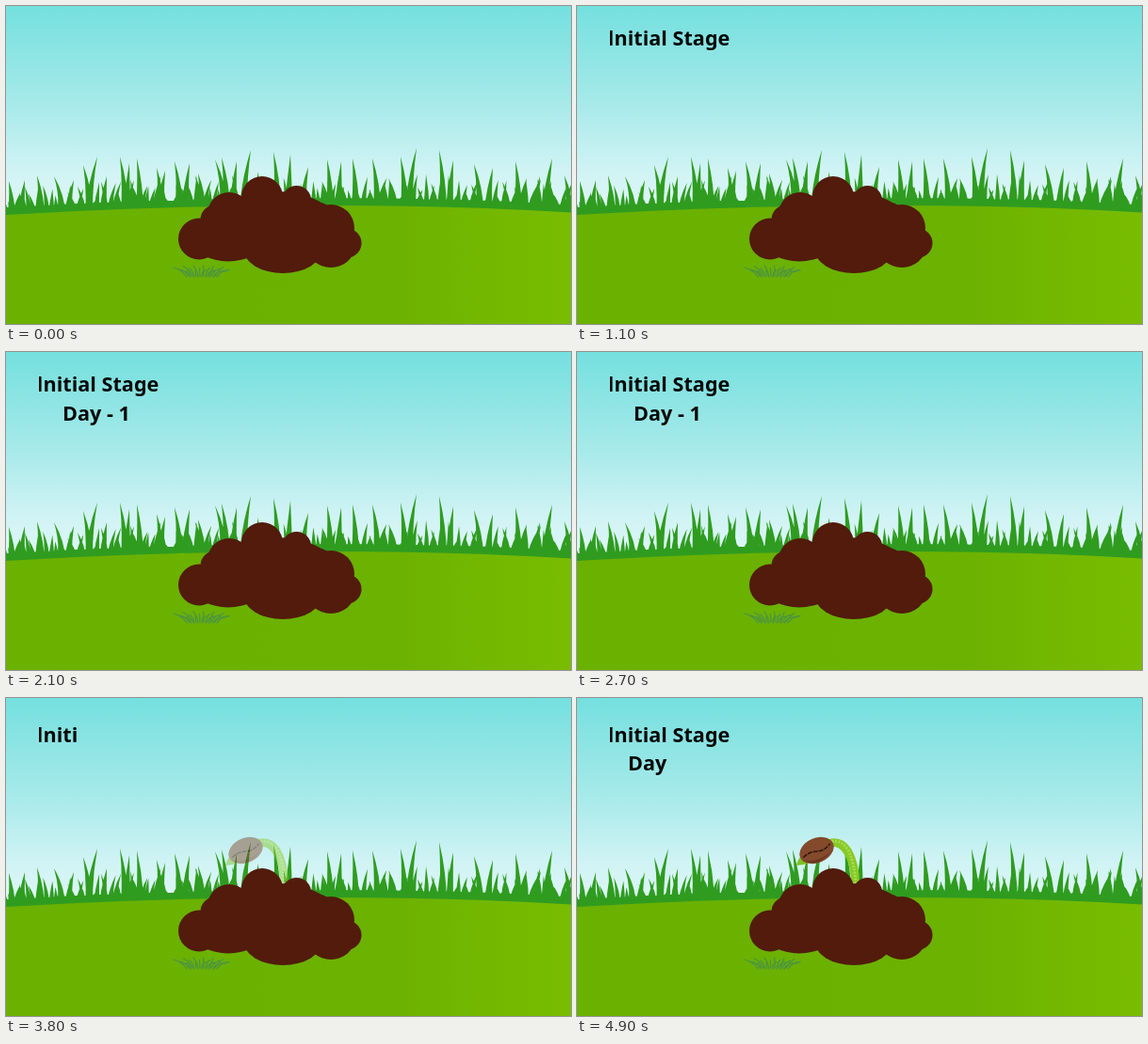
Write an HTML page that moves like this. It is 600x338 px and loops after 5000 ms.

```html
<!DOCTYPE html>
<html lang="en">
<head>
<meta charset="utf-8">
<title>Sprouting seed</title>
<style>
  html, body { margin: 0; width: 100%; height: 100%; overflow: hidden; }
  svg { display: block; width: 100vw; height: 100vh; }
  text { font: 600 21.6px "Noto Sans", "Open Sans", sans-serif; fill: #050807; }
  #cap { font-family: "Open Sans", sans-serif; }
</style>
</head>
<body>
<svg viewBox="0 0 600 338" preserveAspectRatio="none">
  <defs>
    <linearGradient id="sky" x1="0" y1="0" x2="0" y2="1">
      <stop offset="0" stop-color="#74e0de"/>
      <stop offset=".5" stop-color="#a9eaea"/>
      <stop offset=".8" stop-color="#cff3f4"/>
      <stop offset="1" stop-color="#def6f7"/>
    </linearGradient>
    <linearGradient id="lawn">
      <stop offset="0" stop-color="#6bb100"/>
      <stop offset=".7" stop-color="#6cb200"/>
      <stop offset=".82" stop-color="#72b700"/>
      <stop offset="1" stop-color="#79bc00"/>
    </linearGradient>
  </defs>

  <rect width="600" height="215" fill="url(#sky)"/>
  <path id="grass" fill="#2f9c20"/>
  <path d="M0 222Q170 212 340 212Q480 212 600 219.5V338H0Z" fill="url(#lawn)"/>

  <g id="sprout" opacity="0">
    <path d="M264 151Q281 145 291 160Q300 175 300 198L291 199Q291 176 283 165Q276 155 266 159Z" fill="#87c927"/>
    <path d="M267 153Q282 149 289 164Q295 177 296 198" fill="none" stroke="#a9dc4d" stroke-width="3" stroke-dasharray="2 1.5"/>
    <path d="M233 178Q235 170 239 167L247 175Q240 178 233 178Z" fill="#7fc022"/>
    <g transform="translate(254.500 162) rotate(-24)">
      <ellipse rx="19" ry="13" fill="#834a2c"/>
      <path d="M-17 4Q-4 13 14 7Q5 12 -4 12Q-13 10 -17 4Z" fill="#6b361f"/>
      <path d="M-16 1Q-8 -2 0 1T16 -1" fill="none" stroke="#351509" stroke-width="1.500" stroke-dasharray="5 1"/>
    </g>
  </g>

  <g fill="#521b0b">
    <circle cx="205" cy="247.500" r="22"/>
    <circle cx="222" cy="227" r="15.500"/>
    <circle cx="237" cy="221" r="23"/>
    <circle cx="272" cy="203" r="22"/>
    <circle cx="308.500" cy="206.500" r="15.500"/>
    <circle cx="329" cy="230" r="22"/>
    <circle cx="345" cy="236" r="25"/>
    <circle cx="362" cy="252" r="15.500"/>
    <ellipse cx="345" cy="256" rx="25" ry="22"/>
    <ellipse cx="236" cy="250" rx="36" ry="21.500"/>
    <ellipse cx="294" cy="258" rx="42" ry="26"/>
    <ellipse cx="288" cy="232" rx="62" ry="35"/>
  </g>

  <path id="tuft" fill="none" stroke="#46904f" stroke-width="1.300" stroke-linecap="round" opacity=".85"/>

  <text id="line1"><tspan id="cap"></tspan><tspan id="rest"></tspan></text>
  <text id="line2"></text>
</svg>

<script>
const $ = id => document.getElementById(id);

// tip x, tip y, sideways lean from the root
const blades = [
  [3,186,-3], [20,185,4], [33,180,-4], [51,181,-8], [72,185,6],
  [97,160,9], [82,169,-6], [107,181,4], [121,160,-5], [131,167,3],
  [139,162,-3], [160,172,-4], [169,175,5], [179,165,-5], [195,167,5],
  [204,178,-4], [222,163,-9], [229,161,-5], [245,165,4], [260,153,8],
  [268,176,3], [284,155,-4], [302,158,2], [321,171,6], [341,163,-3],
  [356,165,3], [368,162,-3], [389,162,-5], [404,183,7], [419,160,-4],
  [436,151,8], [460,153,-4], [475,164,4], [497,168,-6], [517,172,5],
  [541,165,-3], [553,183,6], [567,181,5], [580,162,7], [593,180,-5]
];

let seed = 11;
const rand = () => (seed = seed * 16807 % 2147483647) / 2147483647;
const ground = x => 213 + 9 * ((x - 350) / 350) ** 2;

function blade(x, y, lean, w) {
  const root = x - lean, base = ground(root) + 2, mid = y + (base - y) * .5;
  return `M${root - w} ${base}Q${root - w * .5} ${mid} ${x} ${y}` +
         `Q${root + w * .9} ${mid} ${root + w} ${base}Z`;
}

let grass = "M0 214Q170 204 340 204Q480 204 600 211V224H0Z";
for (const [x, y, lean] of blades) grass += blade(x, y, lean, 4);
for (let x = 0; x < 602; x += 4.8) {
  const lean = (rand() - .5) * 14;
  grass += blade(x + lean, ground(x) - 13 - rand() * 22, lean, 3.2);
}
$("grass").setAttribute("d", grass);

let tuft = "";
for (let i = 0; i < 17; i++) {
  const u = i / 8 - 1, root = 208 + u * 16;
  const tip = 209 + u * 28 + (i % 3 - 1) * 3, top = 276 + i % 3 * 2.5 + u * u * 2;
  tuft += `M${root} ${288 - i % 2}Q${root + u * 4} 281 ${tip} ${top}`;
}
$("tuft").setAttribute("d", tuft);

const scenes = [
  { from: 0, to: 3000, start: 0, rate: .012, second: "Day - 1", x: 60, y: 42 },
  { from: 3000, to: 5000, start: 3270, rate: .01, second: "Day - 2", x: 54, y: 46.5 }
];
const first = "Initial Stage";

function place(el, x, y) {
  el.setAttribute("x", x);
  el.setAttribute("y", y);
}

function draw() {
  const t = performance.now() % 5000;
  const s = scenes.find(s => t < s.to);
  const n = Math.max(0, Math.floor((t - s.start) * s.rate));
  place($("line1"), 33, s.y);
  place($("line2"), s.x, s.y + 30.5);
  $("cap").textContent = first.slice(0, Math.min(n, 1));
  $("rest").textContent = first.slice(1, Math.max(n, 1));
  $("line2").textContent = s.second.slice(0, Math.max(0, n - first.length));
  $("sprout").setAttribute("opacity", Math.min(1, Math.max(0, (t - 3300) / 1050)));
  requestAnimationFrame(draw);
}
draw();
</script>
</body>
</html>
```
